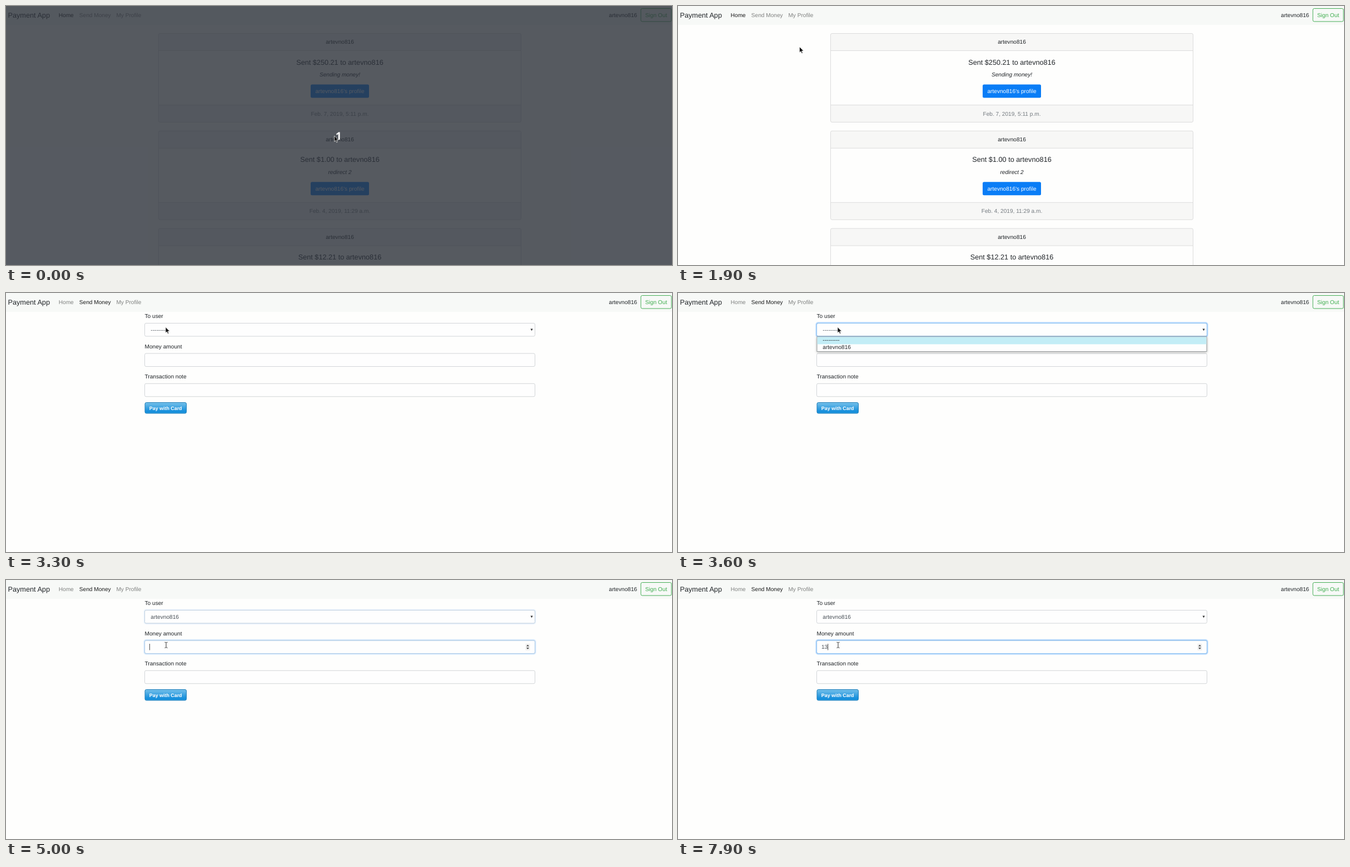
Recreate the animation shown at these times as an HTML page. Size 1198x467 px, loop 8000 ms.

```html
<!DOCTYPE html>
<html lang="en">
<head>
<meta charset="utf-8">
<title>Payment App</title>
<style>
  html, body { margin: 0; height: 100%; overflow: hidden; background: #fefefd; }
  svg { display: block; width: 1198px; height: 467px; }
  text { font: 10.15px "Liberation Sans", Arial, sans-serif; fill: #212529; text-rendering: geometricPrecision; white-space: pre; }
  .big { font-size: 12.7px; }
  .mid { text-anchor: middle; }
  .note { font-style: italic; }
  .white { fill: #fff; }
  .date { fill: #757b80; }
  .field { fill: #495057; }
  .pay { font-size: 8.9px; font-weight: bold; fill: #fff; }
  .count { font: bold 19px "Noto Sans", sans-serif; fill: #fff; }
  .box { fill: #fefefe; stroke: #d2d5d8; }
  .popup { filter: drop-shadow(0 1.5px 2px rgba(0, 0, 0, .3)); }
</style>
</head>
<body>
<svg viewBox="0 0 1198 467">
  <defs>
    <linearGradient id="payFill" x2="0" y2="1">
      <stop stop-color="#74c0ea"/><stop offset=".85" stop-color="#128ddb"/><stop offset="1" stop-color="#30a0e2"/>
    </linearGradient>
  </defs>
  <g id="home"></g>
  <g id="form"></g>
  <g id="nav"></g>
  <g id="countdown">
    <rect width="1198" height="467" fill="rgba(44,49,58,.8)"/>
    <text class="count mid" x="598.3" y="240.5">1</text>
  </g>
  <g id="cursor">
    <path id="arrow" d="M0 0V10.5L2.4 8.3 4.1 12 5.8 11.2 4.2 7.6H7.5Z" fill="#111" stroke="#fff" stroke-width=".7"/>
    <path id="beam" d="M-2.5-5Q0-5 0-4Q0-5 2.5-5M0-4V4M-2.5 5Q0 5 0 4Q0 5 2.5 5" fill="none" stroke="#333"/>
    <path id="hand" d="M-1 .5Q0-.8 1 .5V5L6 6.2Q7 6.6 6.8 8L6 12.5H0L-3.5 8Q-3.5 6.5-1 8Z" fill="#fff" stroke="#111" stroke-width=".9"/>
  </g>
</svg>
<script>
const LOOP = 8000, USER = 'artevno816';
const $ = id => document.getElementById(id);
const text = (x, y, str, cls = '', id = '') => `<text x="${x}" y="${y}" class="${cls}" id="${id}">${str}</text>`;
const rect = (x, y, w, h, attrs) => `<rect x="${x}" y="${y}" width="${w}" height="${h}" ${attrs}/>`;

function card(y, amount, note, date) {
  return `<g transform="translate(0 ${y})">
    ${rect(274.5, 0, 652, 160, 'rx="2.5" fill="#f7f7f6" stroke="#dcdcdc"')}
    ${rect(275, 31, 651, 98, 'fill="#fefefd"')}
    <path d="M275 31H926M275 129H926" stroke="#dcdcdc"/>
    ${text(600.5, 18.9, USER, 'mid')}
    ${text(600.5, 56, `Sent $${amount} to ${USER}`, 'mid big')}
    ${text(600.5, 77.7, note, 'mid note')}
    ${rect(548, 92, 105, 24, 'rx="2.5" fill="#0a7df6"')}
    ${text(600.5, 107.5, USER + "'s profile", 'mid white')}
    ${text(600.5, 148, date, 'mid date')}
  </g>`;
}

const input = (y, id) => rect(249.5, y, 702, 23.5, 'rx="2.5" class="box"') + (id ? `<g id="${id}" fill="none">
  ${rect(248.5, y - 1, 704, 25.5, 'rx="3.5" stroke="#007bff" stroke-opacity=".25" stroke-width="2.4"')}
  ${rect(249.5, y, 702, 23.5, 'rx="2.5" stroke="#86bdf0"')}</g>` : '');

$('home').innerHTML =
  card(49.5, '250.21', 'Sending money!', 'Feb. 7, 2019, 5:11 p.m.') +
  card(225.3, '1.00', 'redirect 2', 'Feb. 4, 2019, 11:29 a.m.') +
  card(401.1, '12.21', '', '');

$('nav').innerHTML = rect(0, 0, 1198, 34, 'fill="#f7f9f7"') +
  text(3.5, 20.7, 'Payment App', 'big') +
  text(94.7, 19.8, 'Home', '', 'homeLink') +
  text(131.8, 19.8, 'Send Money', '', 'sendLink') +
  text(198.4, 19.8, 'My Profile', '', 'profileLink') +
  text(1084.5, 19.8, USER) +
  rect(1142, 4.5, 55, 23.5, 'rx="2.5" fill="none" stroke="#45ad55"') +
  '<text x="1169.5" y="19.8" class="mid" style="fill:#3fae4f">Sign Out</text>';

$('form').innerHTML =
  text(249.5, 45, 'To user') + input(54.5, 'selectFocus') +
  text(260.3, 69.7, '', 'field', 'choice') +
  '<path d="M943.5 64.5H947.7L945.6 68.3Z" fill="#333"/>' +
  text(249.5, 99.5, 'Money amount') + input(109, 'amountFocus') +
  text(257.9, 124.2, '', 'field', 'amount') +
  '<path id="caret" d="M0 115V126.5" stroke="#333" stroke-width=".9"/>' +
  `<g id="spinner">${rect(934.5, 114.8, 8, 12, 'fill="#efefef"')}
    <path d="M936 119.5H941L938.5 116.8ZM936 122H941L938.5 124.7Z" fill="#444"/></g>` +
  text(249.5, 153.8, 'Transaction note') + input(163.3) +
  rect(250, 197.5, 74.5, 19.5, 'rx="2.5" fill="url(#payFill)" stroke="#1d7db8"') +
  text(287.2, 210.7, 'Pay with Card', 'pay mid') +
  `<g id="popup"><g class="popup">${rect(250, 79, 701, 26.5, 'fill="#fefefe" stroke="#8f9496" stroke-width=".9"')}</g>
    <rect id="highlight" x="250.5" width="700" height="13" fill="#c3edf6"/>
    ${text(260.3, 88, '---------')}${text(260.3, 100.8, USER)}</g>`;

// Each entry holds from its time until the next one.
const path = [
  [0, 590.5, 234, 'arrow'], [500, 591, 236, 'beam'], [1100, 590.5, 234, 'arrow'],
  [1300, 540, 225, 'arrow'], [1400, 471.5, 210.3, 'arrow'],
  [1700, 390, 168, 'arrow'], [1800, 280, 106, 'arrow'], [1900, 218.5, 73.5, 'arrow'],
  [2100, 190, 50, 'arrow'], [2200, 172, 35, 'arrow'],
  [2400, 164, 24, 'arrow'], [2500, 161, 17.5, 'hand'], [2800, 187.5, 38, 'arrow'],
  [3000, 215, 45, 'arrow'], [3100, 252, 54, 'arrow'], [3200, 277, 59, 'arrow'], [3300, 287, 61.5, 'arrow'],
  [3800, 287, 72, 'arrow'], [3900, 287.5, 92, 'arrow'], [4000, 287.5, 98, 'arrow'],
  [4600, 288, 114, 'beam'], [4700, 288, 117.3, 'beam']
];
const selectGlow = [[0, 0], [3400, .4], [3500, .85], [3600, 1], [4900, .6], [5000, .25], [5100, 0]];
const amountGlow = [[0, 0], [4900, .2], [5000, .55], [5100, 1]];
const caretOn = [[0, 0], [4900, 1], [5500, 0], [6100, 1], [6700, 0], [7100, 1], [7600, 0], [7900, 1]];
const typed = [[0, ''], [7100, '1'], [7900, '13']];
const at = (list, t) => list.findLast(entry => entry[0] <= t);

const show = (id, on) => $(id).style.display = on ? '' : 'none';
const ink = (id, color) => $(id).style.fill = color;

function draw(t) {
  const formOpen = t >= 2700;
  const [, x, y, shape] = at(path, t);
  show('countdown', t < 500);
  show('home', !formOpen);
  show('form', formOpen);
  ink('homeLink', formOpen ? '#808281' : '#1a1b1b');
  ink('sendLink', formOpen ? '#1a1b1b' : t >= 2500 ? '#4c4d4c' : '#808281');
  ink('profileLink', '#808281');

  $('cursor').setAttribute('transform', `translate(${x} ${y})`);
  for (const id of ['arrow', 'beam', 'hand']) show(id, id === shape);

  $('choice').textContent = t < 4200 ? '---------' : USER;
  $('selectFocus').style.opacity = at(selectGlow, t)[1];
  $('amountFocus').style.opacity = at(amountGlow, t)[1];
  show('popup', t >= 3500 && t < 4200);
  $('highlight').setAttribute('y', t < 3900 ? 79.4 : 92.2);

  const value = at(typed, t)[1];
  $('amount').textContent = value;
  $('caret').setAttribute('transform', `translate(${258.4 + value.length * 5.65} 0)`);
  show('caret', at(caretOn, t)[1]);
  show('spinner', t >= 4600);
}

const start = performance.now();
function tick() {
  draw((performance.now() - start) % LOOP);
  requestAnimationFrame(tick);
}
tick();
</script>
</body>
</html>
```
